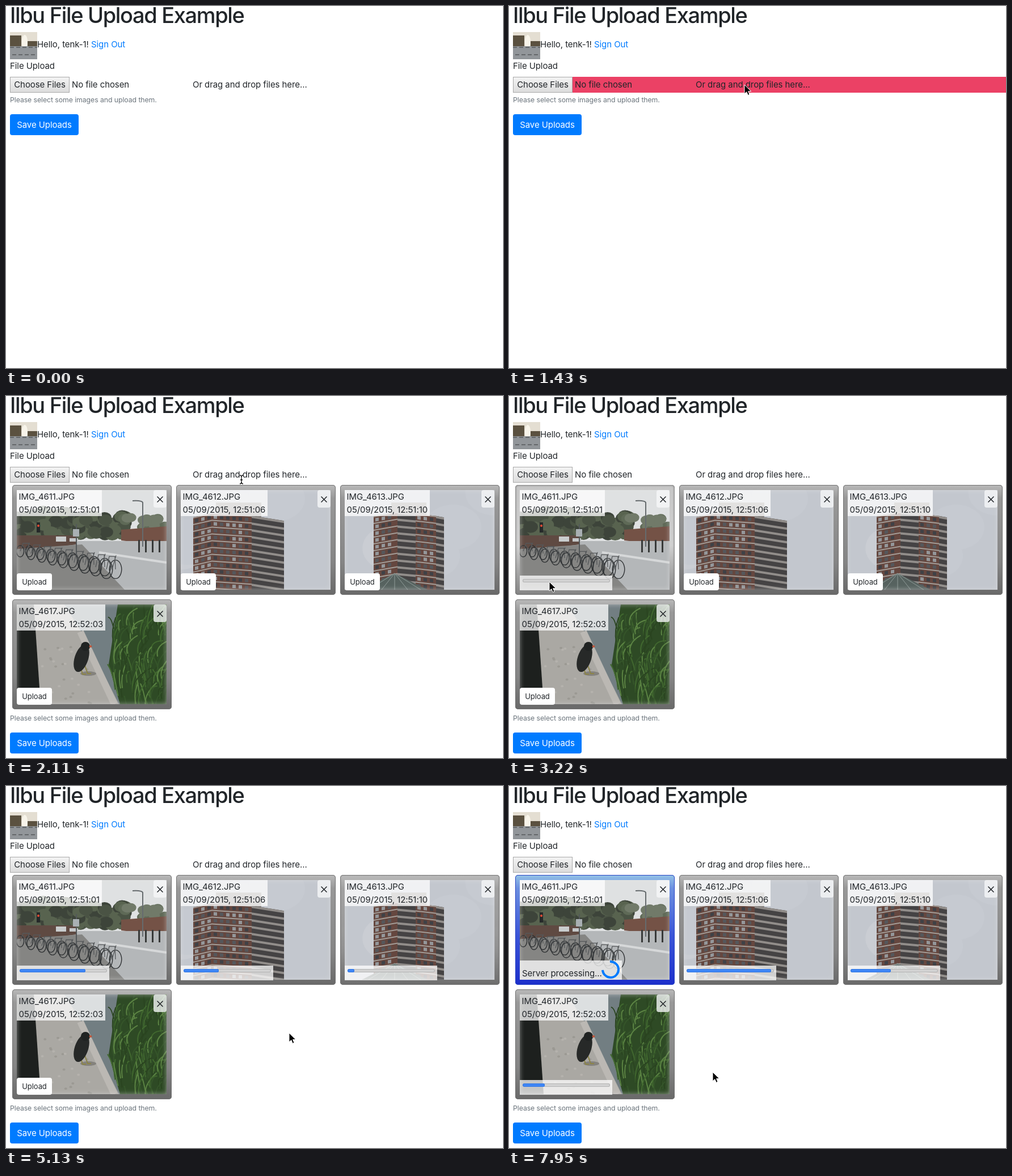
Recreate the animation shown at these times as an HTML page. Size 876 px wide and 639 px high, loop 8 s.

```html
<!DOCTYPE html>
<html lang="en">
<head>
<meta charset="utf-8">
<title>File upload</title>
<style>
html, body { margin: 0; width: 100%; height: 100%; overflow: hidden; background: #fff; }
body {
  position: relative; color: #212529;
  font: 15px/24px Inter, Roboto, sans-serif;
  letter-spacing: -.08px; white-space: nowrap; font-optical-sizing: none;
}
body > *, .card > * { position: absolute; box-sizing: border-box; }
h1 { left: 7px; top: -8px; margin: 0; font-size: 38px; line-height: 48px; font-weight: 540; letter-spacing: -1.35px; }
.avatar { left: 7px; top: 46px; width: 48px; height: 48px; }
.link { color: #007bff; }
.drop { left: 7px; top: 125px; width: 869px; height: 28px; background: #eb4165; }
.choose {
  left: 7px; top: 125px; width: 105px; height: 28px; line-height: 26px; text-align: center;
  background: linear-gradient(#f3f3f3, #dcdcdc); border: 1px solid #a9a9a9;
}
.help { left: 7px; top: 154px; font-size: 12.3px; color: #6c757d; }
.save {
  left: 7px; top: 191px; width: 121px; height: 37px; line-height: 37px; text-align: center;
  color: #fff; background: #007bff; border-radius: 4px;
}
.added .help { top: 557px; }
.added .save { top: 594px; }
.card {
  width: 281px; height: 194px; border-radius: 5px; overflow: hidden;
  background: linear-gradient(#b9b9b9, #989898 12%, #858585 70%, #696969);
  box-shadow: inset 0 0 0 1px #707070;
}
.card.done {
  background: linear-gradient(#94c3e6, #6c8fe0 12%, #3b55d8 55%, #1c2fcb);
  box-shadow: inset 0 0 0 1px #2743c4;
}
.glow { inset: 0; border-radius: 5px; background: linear-gradient(#c6c6c6, #d0d0d0 55%, #858585); box-shadow: inset 0 0 3px 1px #777; }
.done .glow { display: none; }
.photo, .veil { left: 8px; top: 9px; width: 264px; height: 176px; }
.photo { background: #f4f4f4; }
.veil { box-shadow: inset 0 0 9px rgba(225, 225, 225, .55); }
.label, .bar, .busy { left: 8px; background: rgba(255, 255, 255, .75); }
.label { top: 9px; height: 46px; padding: 0 3.5px; line-height: 23px; }
.close { left: 249px; top: 9px; width: 23px; height: 31px; border-radius: 4px; background: rgba(248, 249, 250, .78); }
.upload {
  left: 8px; top: 156px; width: 62px; height: 30px; line-height: 30px; text-align: center;
  font-size: 13px; background: #fff; border-radius: 4px;
}
.bar { top: 160px; width: 163px; height: 26px; }
.bar i { position: absolute; left: 5px; top: 6px; width: 154px; height: 6px; border-radius: 3px; overflow: hidden; background: #d2d2d2; box-shadow: inset 0 0 0 1px #b4b4b4; }
.bar b { display: block; height: 6px; background: #3f86f5; box-shadow: inset 0 0 0 1px #3478e2; border-radius: 3px; }
.busy { top: 151px; width: 180px; height: 34px; padding-left: 4px; line-height: 45px; }
.spin {
  position: absolute; left: 144px; top: 0; box-sizing: border-box; width: 32px; height: 32px;
  border: 4px solid #007bff; border-right-color: transparent; border-radius: 50%;
}
.cursor { left: 0; top: 0; overflow: visible; }
</style>
</head>
<body>
<h1>Ilbu File Upload Example</h1>
<svg class="avatar" viewBox="0 0 48 48">
  <rect width="48" height="48" fill="#e4ded2"/>
  <path d="M0 6h20v20H0zM31 16h17v10H31z" fill="#5b5140"/>
  <ellipse cx="26" cy="17" rx="5" ry="12" fill="#f8f4ea"/>
  <rect y="25" width="48" height="23" fill="#92969a"/>
  <path d="M0 27h48M4 40h40" stroke="#65686b" stroke-width="2" stroke-dasharray="7 4"/>
</svg>
<span style="left:55px;top:56px">Hello, tenk-1!</span>
<span class="link" style="left:150px;top:56px">Sign Out</span>
<span style="left:7px;top:94px">File Upload</span>
<div class="drop"></div>
<div class="choose">Choose Files</div>
<span style="left:116px;top:127px">No file chosen</span>
<span style="left:329px;top:127px">Or drag and drop files here...</span>
<div class="help">Please select some images and upload them.</div>
<div class="save">Save Uploads</div>
<script>
const $ = (sel, el = document) => el.querySelector(sel);
const rect = (x, y, w, h, fill) => `<rect x="${x}" y="${y}" width="${w}" height="${h}" fill="${fill}"/>`;
const oval = (x, y, rx, ry, fill) => `<ellipse cx="${x}" cy="${y}" rx="${rx}" ry="${ry}" fill="${fill}"/>`;
const shape = (d, fill) => `<path d="${d}" fill="${fill}"/>`;
const line = (d, color, w = 1) => `<path d="${d}" fill="none" stroke="${color}" stroke-width="${w}"/>`;
const repeat = (n, fn) => Array.from({ length: n }, (_, i) => fn(i)).join('');

let seed = 7;
const rand = (a = 0, b = 1) => a + (b - a) * (seed = seed * 16807 % 2147483647) / 2147483647;
const pick = list => list[Math.floor(rand(0, list.length))];
const blobs = (n, x, y, w, h, r, colors) =>
  repeat(n, () => oval(rand(x, x + w), rand(y, y + h), r, r * .8, pick(colors)));

function bike(i) {
  const x = 6 + i * 19, y = 108 + i * 4, r = 10 + i * .8;
  const wheel = cx => line(`M${cx} ${y - r}a${r * .65} ${r} 0 1 0 .1 0`, '#2f3234', 1.4);
  return wheel(x) + wheel(x + 16) + line(`M${x} ${y}l5-${r * 1.4}h10l1 ${r * 1.4}m-11-${r}l5 ${r}l7-${r * 1.5}`, '#55585a', 1.3);
}

function street() {
  const leaves = ['#3d443a', '#4a5344', '#58634f'];
  return rect(0, 0, 264, 176, '#dfe1e2') +
    blobs(60, 0, 38, 95, 42, 13, leaves) +
    blobs(60, 98, 45, 95, 36, 12, leaves) +
    blobs(20, 185, 48, 79, 22, 10, ['#717a69', '#5f6a57']) +
    shape('M184 70l80-6v34l-80-9z', '#745246') +
    shape('M0 90h264v86H0z', '#b4b7b9') +
    shape('M0 80h105v16L0 110z', '#5f4a42') +
    shape('M0 104l115-8l75 80H0z', '#858583') +
    line('M145 110l119 18', '#d6d8d9', 4) +
    rect(69, 82, 18, 9, '#c9cccd') + rect(93, 85, 15, 6, '#c3c6c8') +
    line('M105 60v55', '#53585a', 2) + rect(99, 69, 11, 13, '#a9b0b3') +
    line('M222 100V22q-2-4-18-3', '#666b6e', 2) +
    repeat(4, i => rect(214 + i * 12, 88, 3, 22, '#383a39')) +
    rect(35, 57, 6, 18, '#252929') + oval(38, 63, 2, 2, '#f04c34') +
    repeat(9, bike);
}

// Floors of windows, or of dark balconies with pale edges.
function face(w, balcony) {
  const floor = r => balcony
    ? rect(0, r * 12, w, 4, '#918d8a')
    : rect(0, r * 12, w, 2, '#a39d98') +
      repeat(Math.floor(w / 11), c => rect(c * 11 + 3, r * 12 + 4, 6, 6, pick(['#3f4146', '#55575b', '#94979a'])));
  return rect(0, 0, w, 150, balcony ? '#454344' : '#65473f') + repeat(12, floor);
}

// Joins the faces [width, slope, balcony] edge to edge.
function tower(x, y, faces) {
  const sky = rect(0, 0, 264, 176, '#c3c7ce') + blobs(5, 0, 0, 264, 120, 50, ['#c6cad1', '#cacdd3']);
  const width = faces.reduce((sum, f) => sum + f[0], 0);
  return sky + rect(x + width * .25, 22, width * .5, 30, '#8a8683') + faces.map(([w, slope, balcony]) => {
    const part = `<g transform="translate(${x} ${y}) skewY(${slope})">${face(w, balcony)}</g>`;
    x += w;
    y += w * Math.tan(slope * Math.PI / 180);
    return part;
  }).join('');
}

const wideTower = () => tower(22, 48, [[33, -13], [70, 4], [57, 9, true]]);

const glassTower = () => tower(51, 46, [[42, -10], [32, 5, true], [36, 7], [14, 10, true]]) +
  shape('M88 147L30 176H146z', '#56625f') +
  repeat(5, i => line(`M88 147L${42 + i * 23} 176`, '#8f9b98'));

function bird() {
  const blade = () => {
    const x = rand(168, 264), y = rand(30, 190);
    return line(`M${x} ${y}q-4-20 ${rand(-14, 26)}-${rand(20, 44)}`, pick(['#41682f', '#5b8343', '#2a4420', '#35552a']), 2);
  };
  return rect(0, 0, 264, 176, '#aaa8a3') +
    shape('M0 0h30l12 176H0z', '#1d201e') +
    shape('M84 0h180v176h-84L126 68z', '#727e82') +
    line('M112 48L172 176', '#bbb8b3', 12) +
    shape('M178 0h86v176h-82l-20-70z', '#2e4a25') +
    repeat(130, blade) +
    blobs(30, 45, 75, 85, 100, 2.5, ['#9b9993', '#b5b2ad']) +
    oval(126, 122, 14, 4, '#84827d') +
    line('M112 110l4 13h6M120 108l5 14h6', '#8c8447', 2) +
    `<g transform="rotate(18 114 95)">${oval(114, 95, 12, 25, '#272928')}</g>` +
    oval(121, 74, 8, 8, '#202322') + oval(130, 74, 2.5, 2, '#bd563d');
}

// Upload progress as [time, share] points; the first one is the click.
const files = [
  { name: 'IMG_4611.JPG', taken: '12:51:01', draw: street, sent: [[3220, 0], [5130, .75], [5780, .9]] },
  { name: 'IMG_4612.JPG', taken: '12:51:06', draw: wideTower, sent: [[3990, 0], [5130, .4], [6300, .715], [6680, .965]] },
  { name: 'IMG_4613.JPG', taken: '12:51:10', draw: glassTower, sent: [[4920, 0], [5130, .08], [6100, .46]] },
  { name: 'IMG_4617.JPG', taken: '12:52:03', draw: bird, sent: [[6300, .06], [6890, .25]] },
];
files.forEach((file, i) => {
  const el = file.el = document.createElement('div');
  file.x = 11 + i % 3 * 289;
  file.y = 157 + Math.floor(i / 3) * 202;
  el.className = 'card';
  el.style.left = file.x + 'px';
  el.style.top = file.y + 'px';
  el.innerHTML = `<div class="glow"></div>
    <div class="photo"><svg width="264" height="176">${file.draw()}</svg></div><div class="veil"></div>
    <div class="label">${file.name}<br>05/09/2015, ${file.taken}</div>
    <svg class="close" viewBox="0 0 23 31">${line('M6.5 11.5l10 10m0-10l-10 10', '#212529', 1.5)}</svg>
    <div class="upload">Upload</div><div class="bar"><i><b></b></i></div>
    <div class="busy"><span></span><div class="spin"></div></div>`;
  document.body.append(el);
});
document.body.insertAdjacentHTML('beforeend', `<svg class="cursor" width="14" height="20">
  <path class="arrow" d="M0 0V16L3.8 12.6 6.3 18.4 9 17.3 6.6 11.6H11.8Z" stroke="#fff"/>
  <path class="beam" d="M-3 1q3 0 3 3v9q0 3-3 3M3 1q-3 0-3 3v9q0 3 3 3M-2 9h4" fill="none" stroke="#111" stroke-width="1.3"/></svg>`);

const ENTER = 450, DRAG = 980, DROP = 1640, LOADED = 2110, LEAVE = 2220, SERVER = 6100;

// Pointer glides: start, end, x, y.
const glides = [
  [ENTER, DRAG, 805, 140], [1400, 1430, 415, 139], [LEAVE, 2630, 115, 353], [2780, 3070, 71, 328],
  [3400, 3900, 330, 328], [4150, 4800, 616, 330], [4920, 5130, 499, 436], [5130, 5580, 99, 543],
  [5600, 5780, 45, 538], [5780, 6100, 49, 515], [6320, 6680, 359, 505],
];

const clamp = v => Math.max(0, Math.min(1, v));
const ease = p => p * p * (3 - 2 * p);
const mix = (a, b, p) => a + (b - a) * p;
const show = (el, on) => el.style.display = on ? '' : 'none';

function pointer(t) {
  return glides.reduce(([x, y], [from, to, nx, ny]) => {
    const p = ease(clamp((t - from) / (to - from)));
    return [mix(x, nx, p), mix(y, ny, p)];
  }, [870, 197]);
}

const progress = (points, t) => points.reduce((share, [time, next], i) => {
  const from = i ? points[i - 1][0] : time - 1;
  return mix(share, next, clamp((t - from) / (time - from)));
}, 0);

function over({ x, y }, t) {
  const [px, py] = pointer(t);
  return px > x && px < x + 281 && py > y && py < y + 194;
}

// The hover fades over a quarter of a second: average the recent past.
const hover = (file, t) => [0, 50, 100, 150, 200].filter(ago => over(file, t - ago)).length / 5;

function render(t) {
  const beam = t >= LOADED && t < LEAVE;
  const [x, y] = pointer(t);
  document.body.classList.toggle('added', t >= DROP);
  show($('.drop'), t >= DRAG && t < DROP);

  files.forEach((file, i) => {
    const { el, sent } = file;
    const done = i === 0 && t >= SERVER;
    const started = t >= sent[0][0];
    show(el, t >= DROP);
    el.classList.toggle('done', done);
    $('.glow', el).style.opacity = hover(file, t);
    show($('.photo svg', el), t >= LOADED);
    show($('.upload', el), !started);
    show($('.bar', el), started && !done);
    show($('.busy', el), done);
    $('.bar b', el).style.width = progress(sent, t) * 154 + 'px';
  });

  const dots = Math.max(0, Math.floor((t - SERVER) / 250)) % 4;
  $('.busy span').textContent = 'Server processing' + '.'.repeat(dots);
  $('.spin').style.transform = `rotate(${(t - 5990) / 750}turn)`;

  show($('.cursor'), t >= ENTER);
  show($('.arrow'), !beam);
  show($('.beam'), beam);
  $('.cursor').style.transform = `translate(${x}px, ${y}px)`;
}

const start = performance.now();
(function frame() {
  render((performance.now() - start) % 8000);
  requestAnimationFrame(frame);
})();
</script>
</body>
</html>
```
